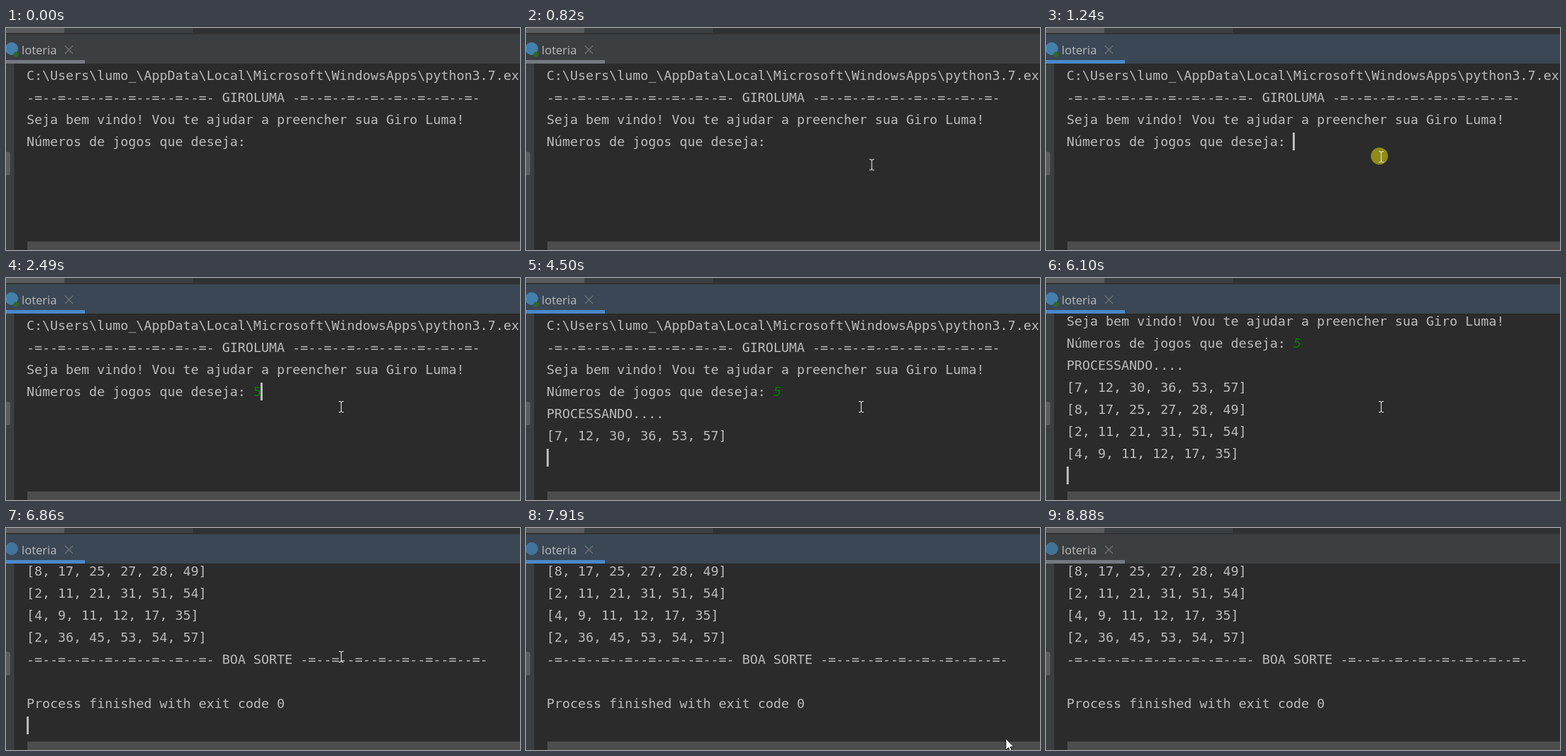
Recreate the animation shown at these times as an HTML page. Size 723 by 312 pixels, loop 9.01 s.

```html
<!DOCTYPE html>
<html lang="pt-BR">
<head>
<meta charset="utf-8">
<title>loteria</title>
<style>
  html, body { margin: 0; width: 100%; height: 100%; overflow: hidden; background: #2b2b2b; }
  .stage { position: relative; width: 723px; height: 312px; overflow: hidden; background: #2b2b2b; }
  .stage div, .stage svg { position: absolute; }
  .anim { animation: 9010ms step-end infinite; }

  /* window chrome */
  .strip { left: 0; top: 0; width: 723px; height: 9px;
    background: linear-gradient(90deg, #595b5d 82px, #3c3f41 82px 263px, #2f3133 263px); }
  .strip::after { content: ""; position: absolute; left: 0; top: 7px; width: 100%; height: 2px; background: #323335; }
  .header { left: 0; top: 9px; width: 723px; height: 41px; background: #3c3f41; animation-name: header; }
  .underline { left: 0; top: 45px; width: 111px; height: 5px; background: #747a80; animation-name: underline; }
  .title { left: 22px; top: 19px; font: 16.5px/24px "Open Sans", "Noto Sans", sans-serif; color: #bbb; }
  .gutter { left: 0; top: 50px; width: 11px; height: 262px; background: #3c3f41; border-right: 1px solid #323335; }
  .handle { left: 0; top: 174px; width: 6px; height: 33px; border-radius: 0 3px 3px 0; background: #5b5d5f; }
  .bar { left: 30px; top: 300px; width: 693px; height: 12px; background: #4d4d4d; }
  .icon { animation-name: stopped-icon; }
  .running { animation-name: running; }

  /* console */
  .pane { left: 12px; top: 50px; width: 711px; height: 250px; overflow: hidden; }
  .rows { left: 17px; top: 1px; width: 760px; height: 124px; overflow: hidden; white-space: pre;
    font: 18.27px/31px "DejaVu Sans Mono", "Noto Sans Mono", monospace;
    font-variant-ligatures: none; color: #bbb; animation-name: rows, scroll; }
  .input { color: #007f00; opacity: 0; animation-name: input; }
  .caret { left: 0; top: 0; width: 3px; height: 25px; background: #bbb; opacity: 0; animation-name: caret; }

  /* pointer */
  .mouse { left: 0; top: 0; width: 1px; height: 1px; overflow: visible; opacity: 0; animation-name: mouse; }
  .click { opacity: 0; animation-name: click; }
  .beam { animation-name: beam; }
  .arrow { opacity: 0; animation-name: arrow; }

  @keyframes header { 13.76% { background: #3b4754; } 98.55% { background: #3c3f41; } }
  @keyframes underline { 13.76% { background: #4a88c7; } 98.55% { background: #747a80; } }
  @keyframes stopped-icon { 76.13% { opacity: .8; } }
  @keyframes running { 76.13% { opacity: 0; } }
  @keyframes rows {
    44.5% { height: 155px; }
    49.94% { height: 186px; }
    56.15% { height: 217px; }
    62.26% { height: 248px; }
    67.7% { height: 279px; }
    73.02% { height: 310px; }
    76.13% { height: 434px; }
  }
  @keyframes scroll {
    0% { transform: translateY(0); }
    56.15% { transform: translateY(-6px); }
    62.26% { transform: translateY(-37px); }
    67.7% { transform: translateY(-68px); }
    73.02% { transform: translateY(-99px); }
    76.13% { transform: translateY(-192px); }
  }
  @keyframes input {
    27.63% { opacity: 1; font-style: normal; }
    42.28% { opacity: 1; font-style: italic; }
  }
  @keyframes caret {
    0% { opacity: 0; transform: translate(347px, 147px); }
    13.76% { opacity: 1; transform: translate(347px, 147px); }
    19.2% { opacity: 0; transform: translate(347px, 147px); }
    25.3% { opacity: 1; transform: translate(347px, 147px); }
    27.63% { opacity: 1; transform: translate(358px, 147px); }
    36.95% { opacity: 0; transform: translate(358px, 147px); }
    42.28% { opacity: 1; transform: translate(29px, 178px); }
    44.5% { opacity: 1; transform: translate(29px, 209px); }
    49.94% { opacity: 1; transform: translate(29px, 240px); }
    56.15% { opacity: 1; transform: translate(29px, 265px); }
    83.12% { opacity: 0; transform: translate(29px, 265px); }
    89.34% { opacity: 1; transform: translate(29px, 265px); }
    94.78% { opacity: 0; transform: translate(29px, 265px); }
  }
  @keyframes mouse {
    0% { opacity: 0; transform: translate(575px, 259px); }
    4.55% { opacity: 1; transform: translate(575px, 259px); animation-timing-function: steps(7, end); }
    9.87% { opacity: 1; transform: translate(471px, 181px); }
    83.12% { opacity: 1; transform: translate(471px, 181px); animation-timing-function: steps(7, start); }
    88.56% { opacity: 1; transform: translate(675px, 296px); animation-timing-function: steps(2, start); }
    90.11% { opacity: 0; transform: translate(681px, 322px); }
    100% { opacity: 0; transform: translate(681px, 322px); }
  }
  @keyframes click { 12.98% { opacity: 1; } 15.31% { opacity: 0; } }
  @keyframes beam { 87.78% { opacity: 0; } }
  @keyframes arrow { 87.78% { opacity: 1; } }
</style>
</head>
<body>
<div class="stage">
  <div class="strip"></div>
  <div class="header anim"></div>
  <div class="underline anim"></div>
  <svg width="111" height="50">
    <circle class="icon anim" cx="8" cy="29" r="9" fill="#4380ae"/>
    <circle class="running anim" cx="14" cy="37" r="3.5" fill="#2a6b25"/>
    <path d="M83 25l11 11M94 25l-11 11" stroke="#6f7376" stroke-width="1.3"/>
  </svg>
  <div class="title">loteria</div>
  <div class="gutter"></div>
  <div class="handle"></div>

  <div class="pane"><div class="rows anim">C:\Users\lumo_\AppData\Local\Microsoft\WindowsApps\python3.7.exe
-=--=--=--=--=--=--=--=- GIROLUMA -=--=--=--=--=--=--=--=-
Seja bem vindo! Vou te ajudar a preencher sua Giro Luma!
Números de jogos que deseja: <span class="input anim">5</span>
PROCESSANDO....
[7, 12, 30, 36, 53, 57]
[8, 17, 25, 27, 28, 49]
[2, 11, 21, 31, 51, 54]
[4, 9, 11, 12, 17, 35]
[2, 36, 45, 53, 54, 57]
-=--=--=--=--=--=--=--=- BOA SORTE -=--=--=--=--=--=--=--=-

Process finished with exit code 0
</div></div>
  <div class="caret anim"></div>
  <div class="bar"></div>

  <svg class="mouse anim">
    <circle class="click anim" cx="-2" cy="-1" r="12" fill="#8f8b16"/>
    <path class="beam anim" d="M-3 -7.5H-1L.5 -6.5L2 -7.5H4M.5 -6.5V6.5M-3 7.5H-1L.5 6.5L2 7.5H4" fill="none" stroke="#dcdcdc" stroke-width="1.2"/>
    <path class="arrow anim" d="M0 0V16L3.7 12.6L6.2 18.2L8.6 17.1L6.2 11.7H11.3Z" fill="#fff" stroke="#1c1c1c" stroke-width="1"/>
  </svg>
</div>
</body>
</html>
```
